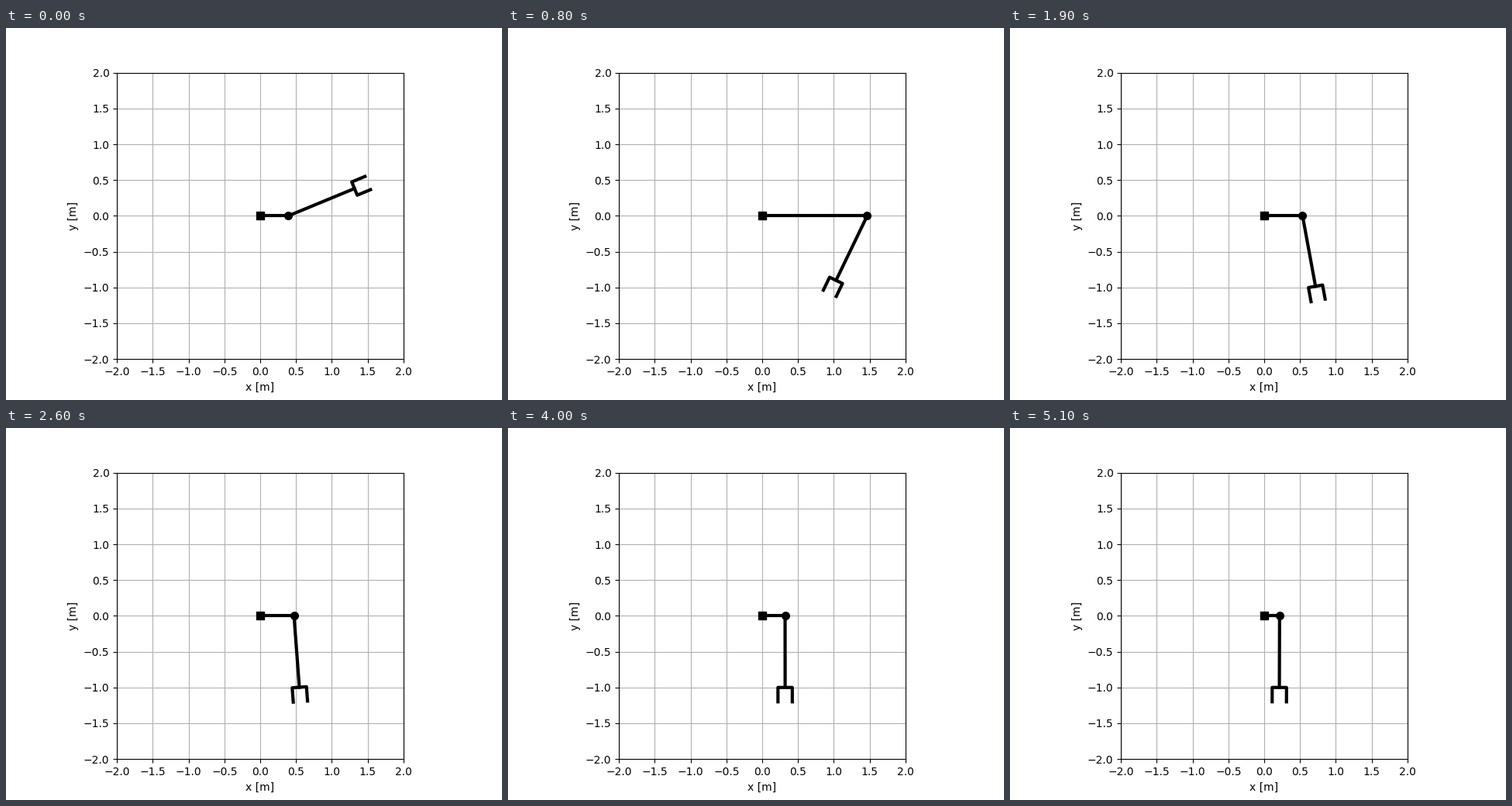
These frames come from a looping animation (640 by 480 pixels, 5200 ms). A matplotlib script:

```python
import numpy as np
import matplotlib.pyplot as plt
from matplotlib.animation import FuncAnimation

FRAMES, STEP = 52, 0.1    # frame count, seconds per frame
MASS_RATIO = 0.93         # share of the total mass carried at the arm's tip
GRIP = 0.2                # gripper width and finger length


def pose(t):
    """Cart position and arm swing from straight down at time t."""
    # The centre of mass creeps home after a short start-up
    centre = 1.435 * np.exp(-0.375 * t) - 0.183 * np.exp(-6 * t)
    # The swing dies out and quickens as it gets smaller
    size = 1.981 * np.exp(-0.55 * t - 0.23 * t ** 2)
    phase = np.pi * t * (0.4845 + 0.377 * t)
    swing = size * np.cos(phase) - 0.015 * centre
    return centre - MASS_RATIO * np.sin(swing), swing


fig, ax = plt.subplots(figsize=(6.4, 4.8), dpi=100)
ax.set_aspect("equal")
ax.set(xlim=(-2, 2), ylim=(-2, 2), xlabel="x [m]", ylabel="y [m]")
ticks = np.arange(-2, 2.1, 0.5)
ax.set_xticks(ticks)
ax.set_yticks(ticks)
ax.grid(True)

rail, arm, gripper = (ax.plot([], [], "k", lw=3)[0] for _ in range(3))
ax.plot([0], [0], "ks", ms=7)
joint, = ax.plot([], [], "ko", ms=7)


def draw(step):
    x, swing = pose(step * STEP)
    base = np.array([x, 0])
    along = np.array([np.sin(swing), -np.cos(swing)])
    across = np.array([-along[1], along[0]]) * GRIP / 2
    wrist = base + along
    reach = along * GRIP
    rail.set_data([0, x], [0, 0])
    joint.set_data([x], [0])
    arm.set_data(*np.transpose([base, wrist]))
    gripper.set_data(*np.transpose([wrist + across + reach, wrist + across,
                                    wrist - across, wrist - across + reach]))
    return rail, arm, gripper, joint


anim = FuncAnimation(fig, draw, frames=FRAMES, interval=100,
                     repeat=True, repeat_delay=0)
plt.show()
```
